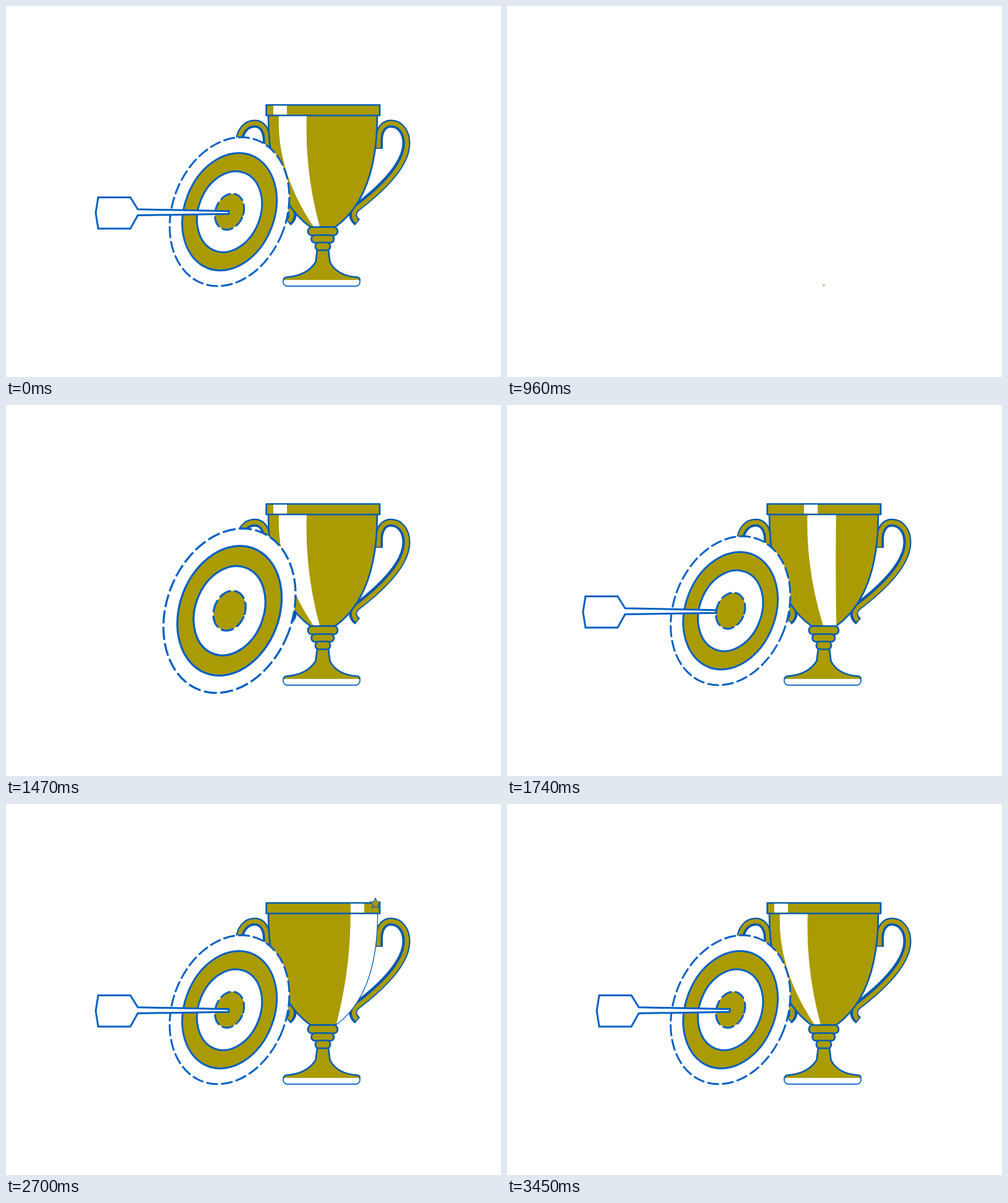
An HTML page for the animation above (4.14 s loop, 800 by 600 pixels).

```html
<!DOCTYPE html>
<html lang="en">
<head>
<meta charset="utf-8">
<title>Target and trophy</title>
<style>
  html, body { margin: 0; width: 100%; height: 100%; overflow: hidden; background: #fff; }
  svg { display: block; width: 100vw; height: 100vh; }
  .gold { fill: #aa9b04; }
  .white { fill: #fff; }
  .line { stroke: #005cb4; stroke-width: 2.7; stroke-linejoin: round; }
  .bright { stroke: #0060c4; stroke-width: 3; }
  .dash { stroke-dasharray: 19 5; }
  .band { fill: none; stroke: #0058b0; stroke-width: 13; }
  .core { fill: none; stroke: #aa9b04; stroke-width: 6.8; }
</style>
</head>
<body>
<svg viewBox="0 0 800 600">
  <defs>
    <path id="cup" d="M424 177H600C600 265 577 325 532 357.500H492C447 325 424 265 424 177Z"/>
    <rect id="rim" x="420.700" y="160" width="183.300" height="17"/>
    <clipPath id="cupClip"><use href="#cup"/></clipPath>
    <clipPath id="rimClip"><use href="#rim"/></clipPath>
    <g id="handle">
      <path class="band" d="M602.500 231V218C602.500 200 611 190.300 622 190.300C636 190.300 647 203 647 222C647 255 610 293 568 325C560 331 557 341 568 350"/>
      <path class="core" d="M602 229.500V217C602 199.500 611 189.500 622 189.500C637 189.500 648 203 648 222C648 256 611 294 569 326C561.500 331 559.500 341 567 348.500"/>
    </g>
  </defs>

  <g id="trophy">
    <use href="#handle"/>
    <use href="#handle" transform="matrix(-1 0 0 1 1024 0)"/>
    <use href="#cup" class="gold line"/>
    <path id="cupShine" class="white" clip-path="url(#cupClip)"/>
    <use href="#rim" class="gold line"/>
    <rect id="rimShine" class="white" y="161.200" width="22" height="14.300" clip-path="url(#rimClip)"/>
    <rect x="448" y="438.500" width="124" height="14.700" rx="7" class="white" stroke="#0060c4" stroke-width="1.700"/>
    <path class="gold" d="M449 443Q450 438.500 455 438.500H565Q570.500 438.500 571.500 443Z"/>
    <path class="gold" d="M503 394H521L523.500 414C531 429 546 437 567 438.500V441H454V438.500C475 437 491 429 500.500 414Z"/>
    <path class="line" fill="none" d="M448.500 443Q449.500 438.500 454 438.500C475 437 491 429 500.500 414L503 394M521 394L523.500 414C531 429 546 437 567 438.500Q571 438.500 572 443"/>
    <g class="gold line">
      <rect x="488" y="357.500" width="48" height="13.500" rx="6.500"/>
      <rect x="493.500" y="370.500" width="36.500" height="12.500" rx="6"/>
      <rect x="500" y="382.500" width="24" height="12.500" rx="5.500"/>
    </g>
  </g>

  <g id="target">
    <g class="bright" transform="translate(361.200 332.700) rotate(21)">
      <ellipse class="white dash" rx="92" ry="124"/>
      <ellipse class="gold" rx="72.600" ry="97.800"/>
      <ellipse class="white" rx="50" ry="67.300"/>
      <ellipse class="gold dash" rx="22.500" ry="30"/>
    </g>
  </g>

  <path id="dart" class="white bright" d="M149 309.500H201L213 328.800L360 331.700V336.300L213 338.500L201 360H149L145 334.500Z"/>
  <polygon id="star" class="gold line"/>
</svg>
<script>
const LOOP = 4140, STEP = 30;
const el = id => document.getElementById(id);
const mix = (a, b, k) => a + (b - a) * k;

// Value at time t of [time, value] keys, eased between neighbours.
function track(t, keys) {
  if (t <= keys[0][0]) return keys[0][1];
  for (let i = 1; i < keys.length; i++) {
    const [t0, a] = keys[i - 1], [t1, b] = keys[i];
    if (t < t1) {
      const u = (t - t0) / (t1 - t0);
      return mix(a, b, u * u * (3 - 2 * u));
    }
  }
  return keys[keys.length - 1][1];
}

const popOut = [[0, 1], [177, 1.105], [480, 0]];
const popIn = start => [[start, 0], [start + 350, 1.105], [start + 525, 1]];
const trophyKeys = [...popOut, ...popIn(938)];
const targetKeys = [...popOut, ...popIn(1113)];
const dartX = [[1440, -400], [1790, 0]];
const shineKeys = [[1490, 0], [2220, 1], [2280, 1], [3450, 0]];
const starKeys = [[2600, 0], [2850, 1.15], [3020, 1], [3120, 1], [3440, 0]];

const starPoints = [];
for (let i = 0; i < 10; i++) {
  const r = i % 2 ? 10.5 : 22, a = i * Math.PI / 5;
  starPoints.push(`${(r * Math.sin(a)).toFixed(2)},${(-r * Math.cos(a)).toFixed(2)}`);
}
el('star').setAttribute('points', starPoints.join(' '));

const place = (id, value) => el(id).setAttribute('transform', value);
const scaleAt = (x, y, s) => `translate(${x} ${y}) scale(${s}) translate(${-x} ${-y})`;

function drawShine(k) {
  el('rimShine').setAttribute('x', mix(432, 609, k));
  const topX = mix(441, 605, k), bend = mix(437, 607, k), lowX = mix(497, 549, k);
  const topR = mix(486, 655, k), bendR = mix(482.5, 660, k), lowR = mix(507, 600, k);
  el('cupShine').setAttribute('d',
    `M${topX} 177Q${bend} 267 ${lowX} 357H${lowR}Q${bendR} 267 ${topR} 177Z`);
}

function render(t) {
  place('trophy', scaleAt(512, 454, track(t, trophyKeys)));
  place('target', scaleAt(361.2, 332.7, track(t, targetKeys)));
  place('dart', t < 960
    ? scaleAt(361, 333.5, track(t, popOut))
    : `translate(${track(t, dartX)} 0)`);
  drawShine(track(t, shineKeys));
  place('star', `translate(597 161) scale(${track(t, starKeys)})`);
}

const begin = performance.now();
function tick() {
  const t = (performance.now() - begin) % LOOP;
  render(Math.floor(t / STEP) * STEP);
  requestAnimationFrame(tick);
}
tick();
</script>
</body>
</html>
```
